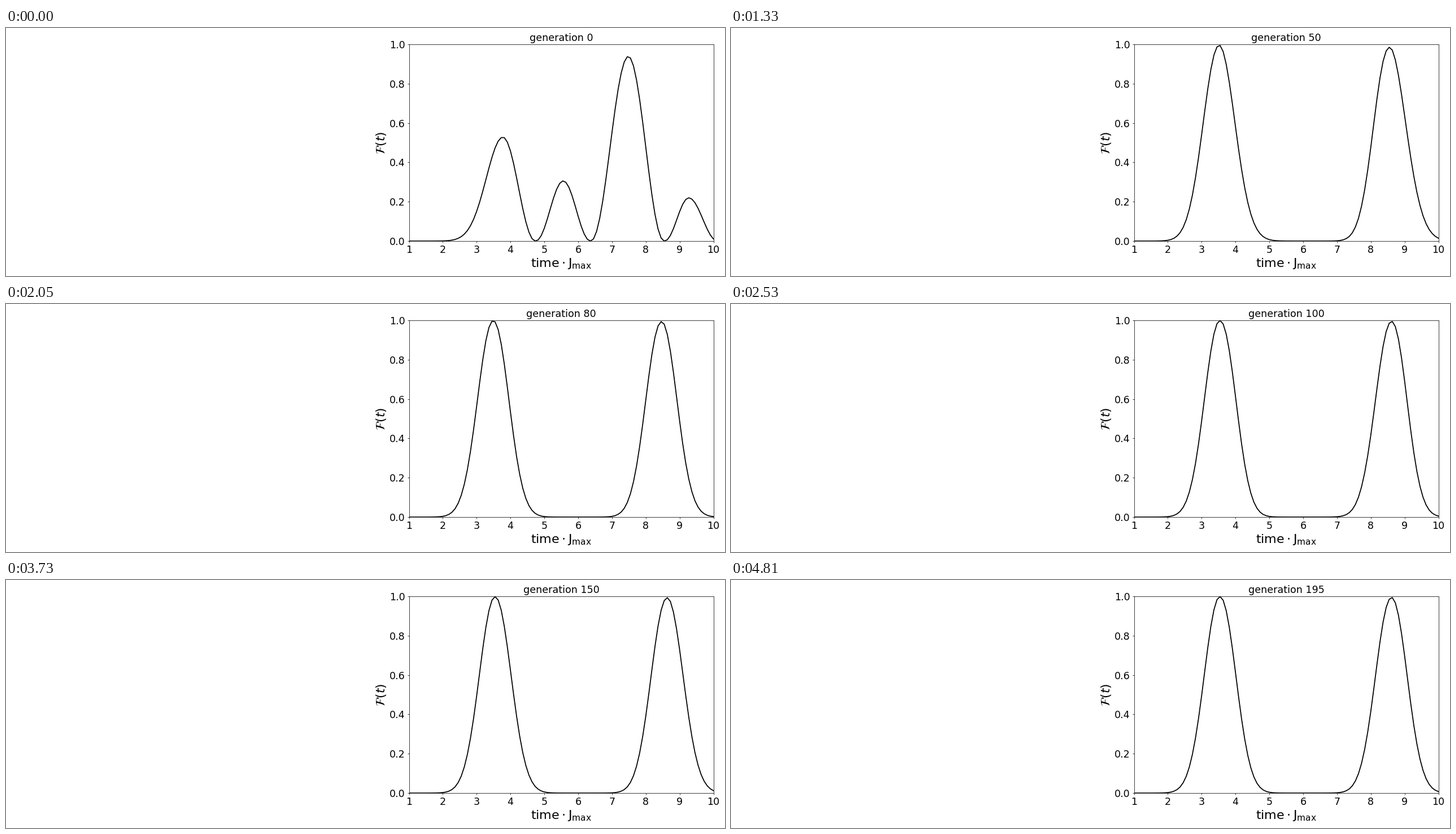
A matplotlib script for the animation above (4.93 s loop, 1273 px wide and 440 px high).

```python
import numpy as np
import matplotlib.pyplot as plt
from matplotlib.animation import FuncAnimation

W, H, DPI = 1273, 440, 68
LOOP_MS = 4930
STEPS = 40          # generations 0, 5, ..., 195
GEN_STEP = 5
SETTLED = 30        # generation from which two clean peaks remain

t = np.linspace(1, 10, 100)

# First generation: alternating peaks and zeros of the amplitude, lobe heights
TURNS = (3.775, 4.74, 5.56, 6.37, 7.485, 8.55, 9.27, 10.13)
LOBES = np.array([.727, .553, .969, .469])
PEAKS = TURNS[0], TURNS[4]

# Later generations: drift of the peaks and how skewed they are
KEYS = (30, 65, 100, 130, 165, 195)
DRIFT = (.21, -.255, 0, 0, .035, 0)
SKEW = (1, .4, 0, 0, .5, .15)


def px(n):
    """Pixels to points."""
    return n * 72 / DPI


def bell(x, height, centre, wl, pl, wr, pr):
    """Bell curve with its own half-width and power on each side."""
    d = x - centre
    left = (np.abs(d) / wl) ** pl
    right = (np.abs(d) / wr) ** pr
    return height * 0.5 ** np.where(d < 0, left, right)


def first_amplitude(x):
    phase = np.interp(x, TURNS, np.pi / 2 * np.arange(1, len(TURNS) + 1))
    lobe = np.minimum((phase / np.pi).astype(int), len(LOBES) - 1)
    wave = np.sin(phase)
    rise = 0.5 ** (np.maximum(TURNS[0] - x, 0) / .815) ** 2
    return LOBES[lobe] * np.sign(wave) * np.abs(wave) ** 1.05 * rise


def centres(gen):
    d = np.interp(gen, KEYS, DRIFT)
    return 3.538 + .33 * d, 8.615 + d


def two_peaks(gen):
    d = np.interp(gen, KEYS, DRIFT)
    k = np.interp(gen, KEYS, SKEW)
    c1, c2 = centres(gen)
    early = bell(t, .999 - .007 * k**2, c1,
                 .53 + .035 * k, 2.05,
                 .545 + .01 * k + .08 * d, 2.14 - .27 * k)
    late = bell(t, .995 - .022 * k**2, c2,
                .55 + .06 * d, 2.07 + .13 * k,
                .525 + .065 * k + .1 * d, 2.09 - .26 * k)
    return early + late


def fidelity(gen):
    if gen >= SETTLED:
        return two_peaks(gen)
    # Slide the first curve's main peaks towards the settled ones while mixing
    s = 1 - (1 - gen / SETTLED) ** 2
    c1, c2 = ((1 - s) * p + s * q for p, q in zip(PEAKS, centres(SETTLED)))
    p1, p2 = PEAKS
    warped = np.interp(t, (1, c1, c2, c2 + 10 - p2), (1, p1, p2, 10))
    mix = (1 - s) * first_amplitude(warped) + s * np.sqrt(two_peaks(SETTLED))
    return mix ** 2


plt.rcParams.update({"font.family": "DejaVu Sans", "font.size": px(17.5)})
fig = plt.figure(figsize=(W / DPI, H / DPI), dpi=DPI, facecolor="white")
ax = fig.add_axes([713.5 / W, (H - 378) / H, 539 / W, 349 / H])
ax.set_xlim(1, 10)
ax.set_ylim(0, 1)
ax.set_xticks(range(1, 11))
ax.set_xlabel(r"$\mathrm{time}\cdot\mathrm{J_{max}}$", fontsize=px(22.2))
ax.set_ylabel(r"$\mathcal{F}(t)$", fontsize=px(22.2), labelpad=px(3))
title = ax.set_title("generation 0", fontsize=px(17.5), pad=px(6))
curve, = ax.plot(t, fidelity(0), color="black", lw=px(1.75))


def update(i):
    # The first generation is held for two ticks
    gen = GEN_STEP * max(i - 1, 0)
    curve.set_ydata(fidelity(gen))
    title.set_text(f"generation {gen}")
    return curve, title


FRAMES = STEPS + 1
anim = FuncAnimation(fig, update, frames=FRAMES, interval=LOOP_MS / FRAMES,
                     repeat=True, repeat_delay=0, blit=False)
plt.show()
```
